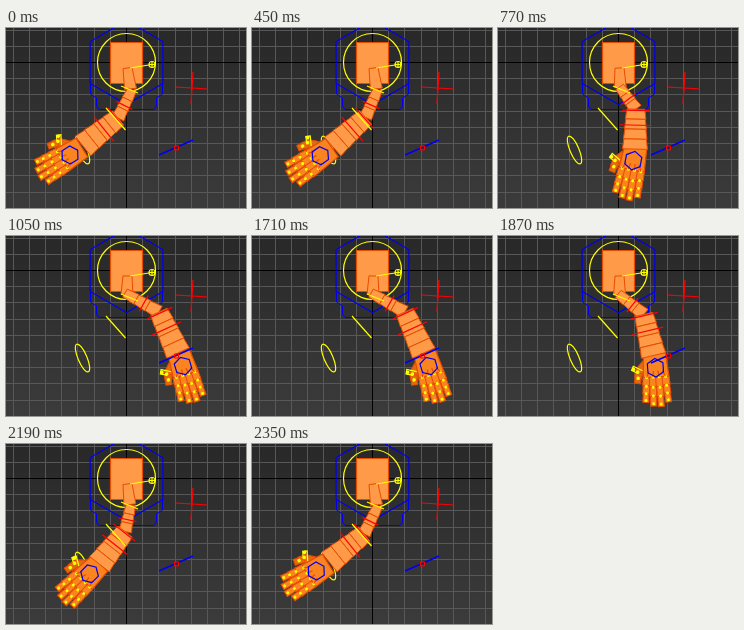
An HTML page with a canvas that plays this animation: 240 px wide and 180 px high, repeating every 3430 ms.

```html
<!DOCTYPE html>
<html lang="en">
<head>
<meta charset="utf-8">
<title>Rigged arm</title>
<style>
html, body { margin: 0; width: 100%; height: 100%; overflow: hidden; background: #303030; }
canvas { display: block; width: 240px; height: 180px; }
</style>
</head>
<body>
<canvas id="stage" width="240" height="180"></canvas>
<script>
const ctx = document.getElementById('stage').getContext('2d');
const LOOP = 3430, STEP = 40, SWING = 680, OUT = 370, BACK = 1670;
const GRID = 16.2, AXIS_X = 120, AXIS_Y = 34;
const SKIN = '#ff9a48', HAND = '#fa8420', THUMB = '#e06c10', EDGE = '#e84c00';
const YELLOW = '#ffff00', RED = '#ff0000', BLUE = '#0000f0';

const backdrop = ctx.createLinearGradient(0, 0, 0, 180);
backdrop.addColorStop(0, '#282828');
backdrop.addColorStop(1, '#3b3b3b');

const mix = (a, b, s) => a + (b - a) * s;
const mixPoint = (a, b, s, sag = 0) =>
  [mix(a[0], b[0], s), mix(a[1], b[1], s) + sag * 4 * s * (1 - s)];
const clamp = v => Math.max(0, Math.min(1, v));
const smooth = u => u * u * (3 - 2 * u);

function path(points, color, { fill, closed = false, width = 1.2 } = {}) {
  ctx.beginPath();
  points.forEach(p => ctx.lineTo(...p));
  if (closed) ctx.closePath();
  if (fill) { ctx.fillStyle = fill; ctx.fill(); }
  ctx.strokeStyle = color;
  ctx.lineWidth = width;
  ctx.stroke();
}

function oval(x, y, rx, ry, turn = 0) {
  ctx.beginPath();
  ctx.ellipse(x, y, rx, ry, turn, 0, 7);
  ctx.strokeStyle = YELLOW;
  ctx.lineWidth = 1.2;
  ctx.stroke();
}

function hexagon(x, y, r) {
  const points = Array.from({ length: 6 }, (_, i) => {
    const a = (i + 0.5) * Math.PI / 3;
    return [x + r * Math.cos(a), y + r * Math.sin(a)];
  });
  path(points, BLUE, { closed: true });
}

function dot(x, y, r = 1.5) {
  ctx.fillStyle = YELLOW;
  ctx.beginPath();
  ctx.arc(x, y, r, 0, 7);
  ctx.fill();
}

// A bone of tapering width, split into plates.
function limb(a, b, w0, w1, plates, fill = SKIN) {
  const dx = b[0] - a[0], dy = b[1] - a[1], len = Math.hypot(dx, dy);
  const at = (s, side) => [a[0] + dx * s - dy / len * side, a[1] + dy * s + dx / len * side];
  for (let i = 0; i < plates; i++) {
    const s = i / plates, e = (i + 1) / plates;
    const h0 = mix(w0, w1, s) / 2, h1 = mix(w0, w1, e) / 2 + 0.5;
    path([at(s, -h0), at(s, h0), at(e, h1), at(e, -h1)], EDGE, { fill, closed: true, width: 1 });
  }
  return at;
}

function drawScene() {
  ctx.fillStyle = backdrop;
  ctx.fillRect(0, 0, 240, 180);
  ctx.fillStyle = '#585858';
  for (let x = AXIS_X % GRID; x < 240; x += GRID) ctx.fillRect(Math.round(x), 0, 1, 180);
  for (let y = AXIS_Y % GRID; y < 180; y += GRID) ctx.fillRect(0, Math.round(y), 240, 1);
  ctx.fillStyle = '#000';
  ctx.fillRect(AXIS_X, 0, 1, 180);
  ctx.fillRect(0, AXIS_Y, 240, 1);

  hexagon(120.5, 34.5, 42);
  path([[84.5, 55], [84.5, 66], [90.5, 70], [90.5, 78], [93, 81.5],
    [148, 81.5], [150.5, 78], [150.5, 70], [156.5, 66], [156.5, 55]], BLUE, { width: 1 });
  path([[104.5, 14.5], [136.5, 14.5], [136.5, 55.5], [104.5, 55.5]], EDGE, { fill: SKIN, closed: true });
  oval(120.5, 34.5, 29, 29);
  oval(76.5, 122, 4.5, 15, -0.4);
  path([[170, 59], [202, 61]], RED);
  path([[187, 44], [185, 76]], RED);
}

function drawHand([x, y], turn, stretch) {
  ctx.save();
  ctx.translate(x, y);
  ctx.rotate(turn);
  ctx.scale(1, stretch);

  limb([-9, -4], [-17, 4], 9, 8, 1, THUMB);
  limb([-17, 4], [-19, 14], 7, 5, 2, THUMB);
  path([[-13, 2], [-22, -3], [-24, 1], [-18, 4]], YELLOW);
  [[-18, 3], [-18, 9], [-22, 0]].forEach(p => dot(...p, 1.8));

  path([[-11, -14], [11, -14], [13, 10], [-13, 11]], EDGE, { fill: HAND, closed: true });
  [33, 37, 38, 34].forEach((length, i) => {
    const root = [-9.5 + i * 6.3, 9], tip = [-12 + i * 7.6, length];
    limb(root, tip, 7, 5, 3, HAND);
    for (const s of [0, 0.35, 0.65, 0.92]) dot(...mixPoint(root, tip, s));
    path([root, [root[0] * 0.7, 3]], EDGE);
  });
  hexagon(0, 0, 9);
  ctx.restore();
}

function drawArm(s) {
  const shoulder = mixPoint([126, 62], [119, 57], s);
  const elbow = mixPoint([112, 90], [153, 76], s);
  const wrist = mixPoint([77, 118], [172, 117], s, 4);
  const palm = mixPoint([64, 127], [177, 130], s, 4);
  const turn = mix(58, -17, s) * Math.PI / 180;

  limb([121.5, 40], mixPoint(shoulder, [123, 60], 0.5), 9, 11, 1);
  const upper = limb(shoulder, elbow, 9, 12, 3);
  drawHand(palm, turn, 1 + 0.2 * s * (1 - s));
  const fore = limb(elbow, wrist, 18, 24, 4);

  path([upper(0.55, -9), upper(0.55, 9)], RED);
  path([fore(0.03, -14), fore(0.03, 14)], RED);
  path([fore(0.4, -16), fore(0.4, 16)], RED);
  path([[115, 58], [132, 65]], YELLOW);
}

function drawHandles() {
  path([[124, 40], [143, 37]], YELLOW);
  oval(146, 36.5, 3, 3);
  path([[143, 36.5], [149, 36.5]], YELLOW);
  path([[146, 33.5], [146, 39.5]], YELLOW);
  path([[100, 80], [119.5, 102]], YELLOW);
  path([[153, 127], [187, 112]], BLUE, { width: 1.8 });
  path([[168.5, 118], [172.5, 118], [172.5, 122], [168.5, 122]], RED, { closed: true, width: 1 });
}

function frame(now) {
  const t = Math.floor((now % LOOP - 10) / STEP) * STEP + 10;
  const swing = smooth(clamp((t - OUT) / SWING)) - smooth(clamp((t - BACK) / SWING));
  drawScene();
  drawArm(swing);
  drawHandles();
  requestAnimationFrame(frame);
}
frame(0);
</script>
</body>
</html>
```
